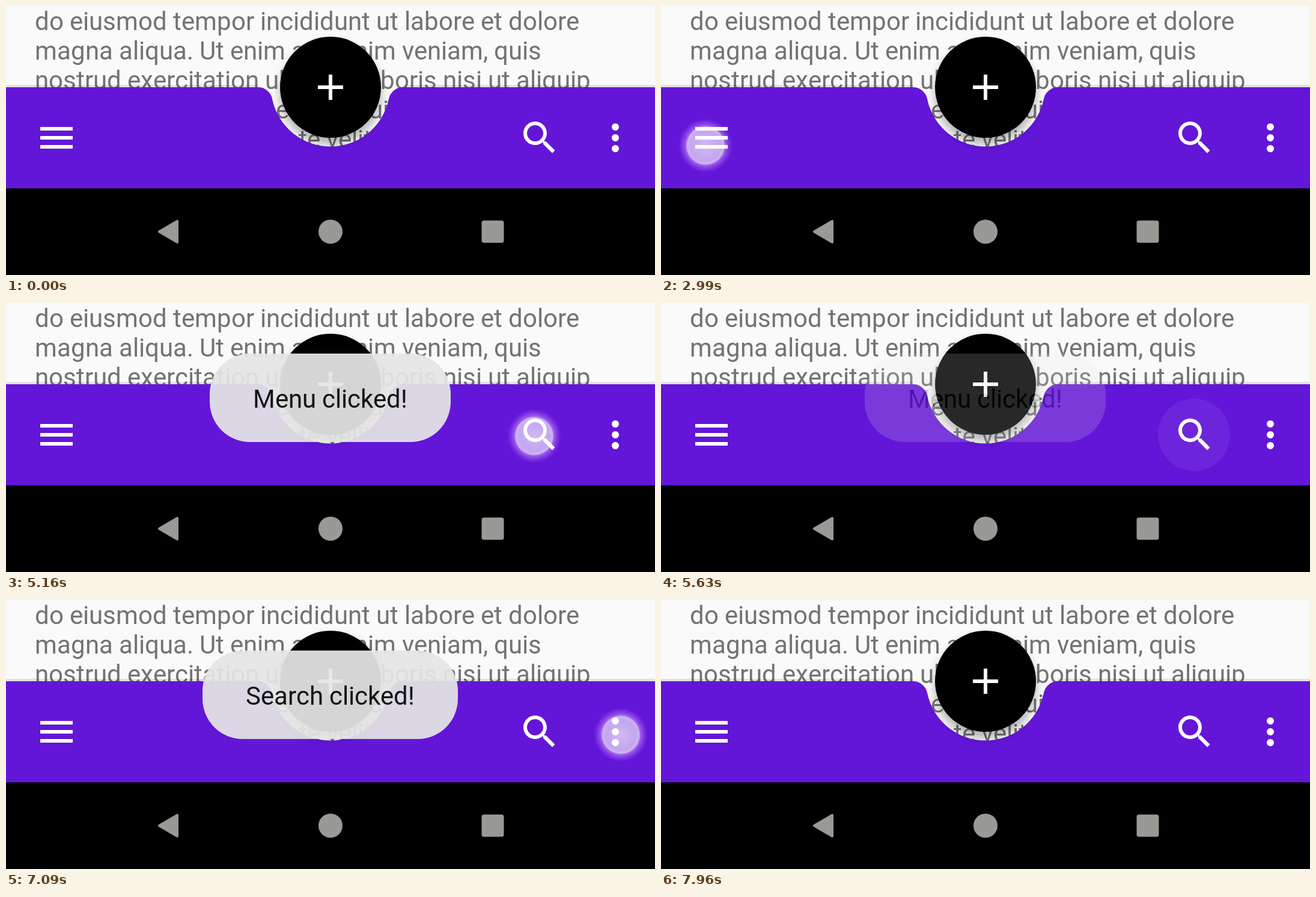
Recreate the animation shown at these times as an HTML page. Size 1080x447 px, loop 8 s.

```html
<!DOCTYPE html>
<html lang="en">
<head>
<meta charset="utf-8">
<title>Bottom app bar</title>
<style>
  html, body { margin: 0; width: 100%; height: 100%; overflow: hidden; background: #000; }
  svg { display: block; width: 100%; height: 100%; }
  text { font: 42px Roboto, sans-serif; }
</style>
</head>
<body>
<svg viewBox="0 0 1080 447">
  <defs>
    <radialGradient id="glow">
      <stop offset="0" stop-color="#fff" stop-opacity=".7"/>
      <stop offset=".55" stop-color="#fff" stop-opacity=".62"/>
      <stop offset=".68" stop-color="#fff" stop-opacity=".68"/>
      <stop offset=".73" stop-color="#d9a8ff" stop-opacity=".5"/>
      <stop offset="1" stop-color="#b070ff" stop-opacity="0"/>
    </radialGradient>
    <filter id="blur" x="-30%" y="-30%" width="160%" height="160%"><feGaussianBlur stdDeviation="8"/></filter>
  </defs>

  <rect width="1080" height="303" fill="#fafafa"/>
  <g id="paragraph" fill="#737373"></g>
  <path d="M0 133H420M660 133H1080" stroke="#000" stroke-opacity=".1" stroke-width="4"/>

  <path fill="#6316d8" d="M0 135H419.4A24 24 0 0 1 443 154.3A99 99 0 0 0 637 154.3A24 24 0 0 1 660.6 135H1080V303H0Z"/>
  <circle cx="540" cy="145" r="84" opacity=".3" filter="url(#blur)"/>
  <circle id="ripple" cy="219" fill="#fff"/>
  <circle id="touch" r="45" fill="url(#glow)"/>

  <g fill="#fff">
    <path d="M57 201h54v6h-54zM57 216h54v6h-54zM57 231h54v6h-54z"/>
    <path transform="translate(852 183) scale(3)" d="M15.5 14h-.79l-.28-.27C15.41 12.59 16 11.11 16 9.5 16 5.91 13.09 3 9.5 3S3 5.91 3 9.5 5.91 16 9.5 16c1.61 0 3.09-.59 4.23-1.57l.27.28v.79l5 4.99L20.49 19zm-6 0C7.01 14 5 11.99 5 9.5S7.01 5 9.5 5 14 7.01 14 9.5 11.99 14 9.5 14z"/>
    <circle cx="1014" cy="201" r="6"/>
    <circle cx="1014" cy="219" r="6"/>
    <circle cx="1014" cy="237" r="6"/>
  </g>

  <circle cx="540" cy="135" r="84"/>
  <path d="M519 135h42M540 114v42" stroke="#fff" stroke-width="6"/>

  <rect y="303" width="1080" height="144"/>
  <g fill="#999996">
    <path d="M255 375L285 357.500V392.500Z" stroke="#999996" stroke-width="4" stroke-linejoin="round"/>
    <circle cx="540" cy="375" r="20"/>
    <rect x="791.500" y="356.500" width="37" height="37" rx="4"/>
  </g>

  <g id="toast">
    <rect id="pill" y="84" height="147" rx="67" fill="#e6e6e6" fill-opacity=".93"/>
    <text id="message" y="174" fill="#141414"></text>
  </g>
</svg>
<script>
const LOOP = 8000, FADE = 500, PADDING = 72;
const [paragraph, ripple, touch, toast, pill, message] =
  ['paragraph', 'ripple', 'touch', 'toast', 'pill', 'message'].map(id => document.getElementById(id));

const lines = [
  'do eiusmod tempor incididunt ut labore et dolore',
  'magna aliqua. Ut enim ad minim veniam, quis',
  'nostrud exercitation ullamco laboris nisi ut aliquip',
  'ex ea commodo consequat. Duis aute irure dolor in',
  'reprehenderit in voluptate velit esse cillum',
];
const taps = [
  { down: 2990, up: 3190, x: 74, y: 232, icon: 84 },
  { down: 5160, up: 5360, x: 879, y: 221, icon: 887 },
  { down: 7090, up: 7290, x: 1023, y: 224, icon: 1014 },
];
const toasts = [
  { text: 'Menu clicked!', enter: 3530, exit: 5180 },
  { text: 'Search clicked!', enter: 5800, exit: 7450 },
];
const stalls = [[5280, 5420], [5890, 6050]];

const pen = document.createElement('canvas').getContext('2d');
pen.font = '42px Roboto, sans-serif';

const clamp = v => Math.min(1, Math.max(0, v));
const set = (node, attributes) => {
  for (const name in attributes) node.setAttribute(name, attributes[name]);
};

// Glyphs advance by whole pixels, as on the device. Returns the text width.
function typeset(node, text, left) {
  const stops = [left];
  for (const char of text) stops.push(stops.at(-1) + Math.round(pen.measureText(char).width));
  const right = stops.pop();
  node.textContent = text;
  set(node, { x: stops.join(' ') });
  return right - left;
}

function drawTap(time) {
  const tap = taps.find(({ down, up }) => time >= down && time < up + 350);
  set(touch, { opacity: 0 });
  set(ripple, { opacity: 0 });
  if (!tap) return;
  set(touch, { cx: tap.x, cy: tap.y, opacity: 1 - clamp((time - tap.up) / 200) });
  const grow = clamp((time - tap.down - 80) / 225);
  const fade = 1 - clamp((time - tap.up - 100) / 250);
  set(ripple, {
    cx: tap.icon,
    r: 60 * (1 - (1 - grow) ** 2),
    opacity: 0.2 * clamp(grow * 3) * fade,
  });
}

function drawToast(time) {
  const current = toasts.find(({ enter, exit }) => time >= enter && time < exit + FADE);
  set(toast, { opacity: 0 });
  if (!current) return;
  const { text, enter, exit } = current;
  const appear = 1 - (1 - clamp((time - enter) / FADE)) ** 2;
  const vanish = clamp((time - exit) / FADE) ** 2;
  set(toast, { opacity: appear * (1 - vanish) });
  const width = typeset(message, text, 0) + 2 * PADDING;
  const left = Math.floor(540 - width / 2);
  set(pill, { x: left, width });
  typeset(message, text, left + PADDING);
}

lines.forEach((line, i) => {
  const node = document.createElementNS('http://www.w3.org/2000/svg', 'text');
  set(node, { y: 40 + 49 * i });
  typeset(node, line, 48);
  paragraph.append(node);
});

const start = performance.now();
function draw() {
  let time = (performance.now() - start) % LOOP;
  const stall = stalls.find(([from, to]) => time >= from && time < to);
  if (stall) time = stall[0];
  drawTap(time);
  drawToast(time);
  requestAnimationFrame(draw);
}
draw();
</script>
</body>
</html>
```
